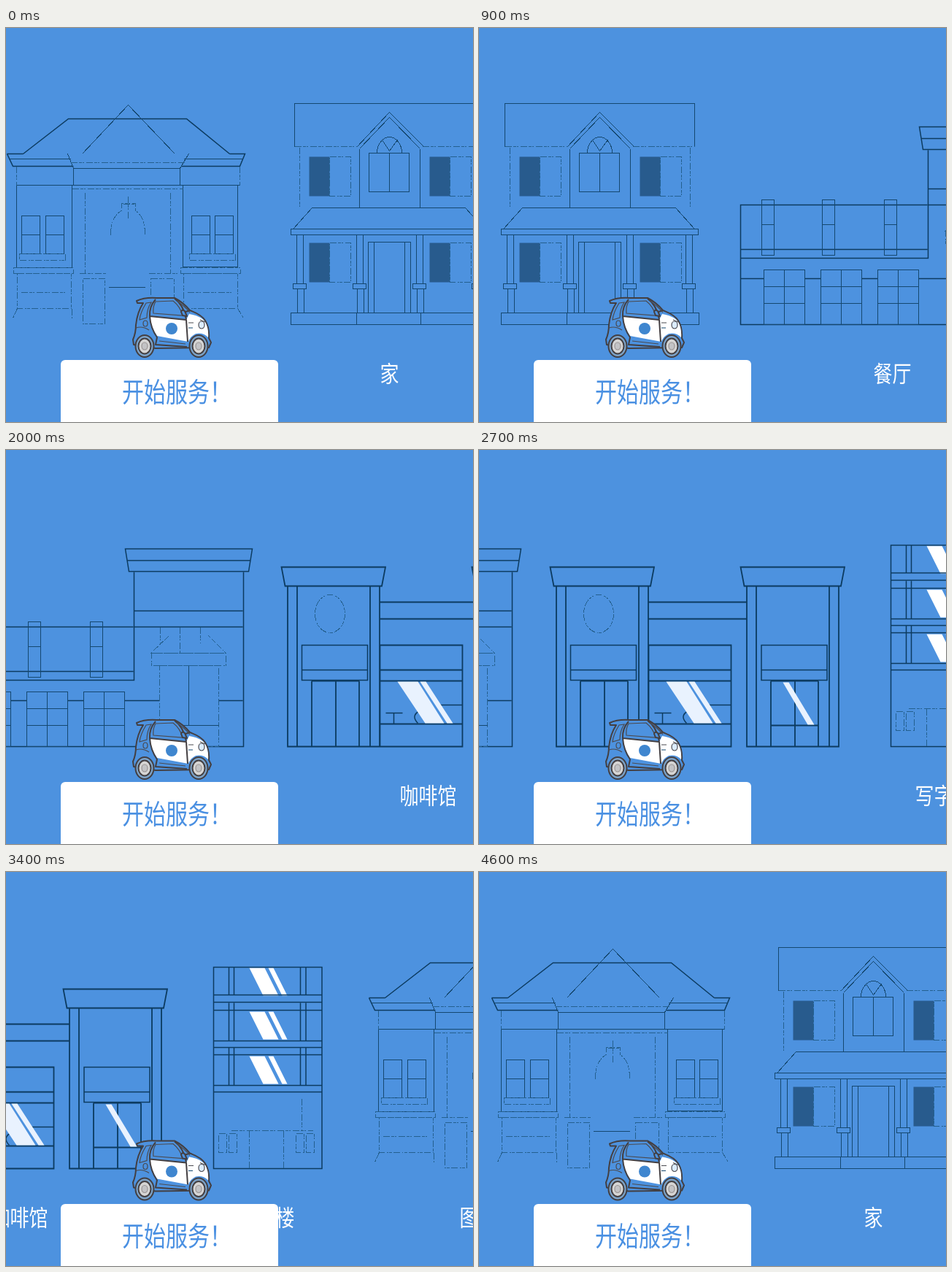
These frames come from a looping animation (640x540 px, 4.7 s). An HTML page:

```html
<!DOCTYPE html>
<html lang="zh-CN">
<head>
<meta charset="utf-8">
<title>开始服务</title>
<style>
html, body { margin: 0; height: 100%; overflow: hidden; background: #4d92df; }
svg { display: block; width: 100vw; height: 100vh; }
path, ellipse { stroke: #154870; stroke-width: 1; }
.line { shape-rendering: crispEdges; }
.bold { stroke: #0c3b60; stroke-width: 1.5; }
.heavy { stroke: #0c3b60; stroke-width: 1.8; }
.faint { shape-rendering: crispEdges; stroke: #24608f; stroke-dasharray: 9 2 4 1 2 3; }
.dark { fill: #285b8d; stroke: none; }
.glass { fill: #e9f2fe; stroke: none; }
.white { fill: #fff; stroke: none; }
text { font-family: "Noto Sans CJK SC", "Noto Sans CJK", sans-serif; fill: #fff; font-size: 26px; font-weight: 500; }
.title { fill: #4a90e2; font-size: 30px; font-weight: 400; }
#car .ink { stroke: #433f42; stroke-width: 2; stroke-linejoin: round; }
#car .thin { stroke: #4a4a50; stroke-width: 1.2; }
</style>
</head>
<body>
<svg viewBox="0 0 640 540" preserveAspectRatio="none" fill="none">
  <g id="street"></g>
  <rect x="75" y="455" width="298" height="100" rx="6" fill="#fff"/>
  <text class="title" transform="scale(1 1.24)" x="159" y="413.5">开始服务！</text>
  <g id="car">
    <path class="ink" fill="#4d92df" d="M179 374Q190 369 206 370L231 370Q243 376 252 387Q268 393 273 401Q279 411 278 425L281 431L278 438L205 439L175 434L174 427Q178 418 178 407Q180 389 188 377L180 377z"/>
    <path class="white" d="M197 395L247 400L251 392Q268 395 273 403Q278 412 277 424Q270 417 260 419Q252 423 250 430L207 422Q198 409 197 395z"/>
    <path class="ink" d="M197 395L247 400L249 430M197 395Q198 411 207 424L205 434L248 437M205 372Q196 382 197 395M231 371Q243 379 247 399M252 387L243 390"/>
    <path class="thin" d="M205 375L229 374Q239 382 242 394L202 391Q201 382 205 375zM192 377Q184 390 183 400L193 397Q193 385 199 376zM178 411Q187 408 196 414M210 429L246 433M234 374Q246 382 252 390M250 404L257 404M273 403L266 400"/>
    <path class="ink" fill="#4d92df" d="M240 389Q241 385 245 388L248 395L242 394z"/>
    <path d="M250 411H256"/>
    <ellipse class="thin" fill="#4d92df" cx="191" cy="405" rx="3" ry="4"/>
    <ellipse class="thin" fill="#dcecff" cx="268" cy="407" rx="4" ry="5"/>
    <circle cx="227" cy="412" r="8" fill="#3f86cf"/>
    <g id="wheel">
      <ellipse class="ink" fill="#7da3c8" cx="190" cy="436" rx="12.5" ry="15"/>
      <ellipse class="ink" fill="#d6d5d4" cx="190" cy="436" rx="8.5" ry="10.5"/>
      <ellipse class="thin" fill="#c3c3c5" cx="190" cy="436" rx="4" ry="5" style="stroke:#9a9595"/>
    </g>
    <use href="#wheel" x="74"/>
  </g>
</svg>
<script>
const box = (l, t, r, b) => `M${l} ${t}H${r}V${b}H${l}z`;
const hor = (y, ...ends) => ends.map((x, i) => i % 2 ? `H${x}` : `M${x} ${y}`).join('');
const ver = (x, ...ends) => ends.map((y, i) => i % 2 ? `V${y}` : `M${x} ${y}`).join('');
const each = (list, draw) => list.map(draw).join('');
const path = (kind, ...parts) => `<path class="${kind}" d="${parts.join('')}"/>`;
const label = (x, name) => `<text transform="scale(1 1.2)" x="${x}" y="403.5">${name}</text>`;
const group = (id, x, ...parts) => `<g id="${id}" transform="translate(${x} 0)">${parts.join('')}</g>`;
// A slanted reflection: top edge from a to b, bottom edge from c to d
const shine = (a, b, c, d, top, bottom) => `M${a} ${top}H${b}L${d} ${bottom}H${c}z`;

const library = group('library', 0,
  path('bold', 'M23 172L85 124H247L306 172M1 172H23M306 172H327L320 189H240M1 172L9 189H92'),
  path('line',
    hor(179, 4, 88, 243, 324),
    'M104 172L167 105L231 172M84 172L92 192H238L250 172',
    ver(92, 192, 215), ver(238, 192, 215), hor(215, 14, 320),
    box(14, 215, 90, 328), box(242, 215, 317, 327),
    each([21, 54, 254, 286], x => box(x, 257, x + 25, 309) + hor(283, x, x + 25)),
    hor(355, 140, 190)),
  path('faint',
    hor(184, 88, 245), hor(220, 90, 242), ver(14, 189, 215), ver(320, 189, 215),
    box(18, 309, 81, 318), box(251, 309, 314, 318),
    box(10, 328, 92, 336), box(239, 328, 321, 336),
    each([15, 243], x => box(x, 336, x + 74, 384) + hor(362, x + 5, x + 65)),
    'M15 384L9 397M317 384L325 397', ver(90, 384, 397),
    box(105, 343, 135, 405), box(198, 343, 230, 385),
    hor(336, 100, 137, 195, 235), ver(108, 225, 336), ver(225, 225, 336),
    'M143 283Q143 258 158 250V240H177V250Q190 258 190 283M167 230V262M160 241H175'),
  label(125, '图书馆'));

const house = group('house', 0,
  path('dark', each([415, 580], x => box(x, 176, x + 28, 230) + box(x, 294, x + 28, 348))),
  path('line',
    'M395 162V103H655V162',
    'M480 163L525 115L573 163M484 165L525 122L567 165',
    ver(484, 165, 246), ver(567, 165, 246),
    box(497, 171, 552, 224), ver(525, 171, 224),
    'M508 171A17 22 0 0 1 542 171M515 153L525 168L536 153',
    'M393 275L419 246H629L655 275', box(390, 275, 660, 283),
    each([398, 480, 562, 643], x =>
      ver(x, 283, 350) + ver(x + 9, 283, 350) + box(x - 5, 350, x + 13, 357) +
      ver(x + 1, 357, 390) + ver(x + 10, 357, 390)),
    box(496, 293, 554, 390), box(504, 293, 546, 390),
    box(390, 390, 661, 406), ver(480, 390, 406), ver(568, 390, 406)),
  path('faint',
    hor(162, 395, 481, 570, 655), ver(402, 163, 246), ver(649, 163, 246),
    each([443, 608], x => box(x, 176, x + 29, 230) + box(x, 294, x + 29, 348))),
  label(512, '家'));

const restaurant = group('restaurant', 520,
  path('bold',
    'M454 242H198V406H605V167M455 167V315H198', hor(303, 198, 454),
    'M443 135H617L612 166H448z', hor(151, 445, 614),
    hor(220, 455, 604), hor(242, 455, 604),
    hor(343, 198, 230, 286, 308, 364, 386, 442, 490, 571, 604)),
  path('line',
    each([230, 308, 386], x =>
      box(x, 331, x + 56, 406) + ver(x + 28, 331, 406) + hor(354, x, x + 56) + hor(377, x, x + 56)),
    each([227, 310, 395], x => box(x, 235, x + 17, 311) + hor(269, x, x + 17)),
    ver(530, 295, 377), hor(377, 490, 571)),
  path('faint',
    'M503 254L478 278H581L557 254', box(479, 278, 581, 295),
    box(490, 295, 571, 406), ver(491, 242, 264), ver(518, 242, 278), ver(546, 242, 264)),
  label(380, '餐厅'));

const tower = x => `M${x - 8.5} 160h142.5l-5 26h-132.5z` + box(x, 186, x + 126, 406) +
  ver(x + 13, 186, 406) + ver(x + 113, 186, 406) +
  ver(x + 33, 316, 406) + ver(x + 66, 316, 406) + ver(x + 98, 316, 406) + hor(316, x + 33, x + 98);
const sign = x => box(x, 267, x + 90, 315) + hor(301, x, x + 90);
const cafe = group('cafe', 1080,
  path('heavy',
    tower(105.5), tower(366.5), hor(208, 232, 366), hor(231, 232, 366),
    box(232, 267, 345, 406), hor(301, 232, 345), hor(316, 232, 345), hor(375, 232, 345),
    hor(377, 399, 465)),
  path('bold', sign(125), sign(386.5), hor(349, 310, 345),
    hor(360, 240, 263), ver(251, 360, 375), 'M286 357Q274 364 284 374'),
  '<ellipse class="faint" cx="163.5" cy="224" rx="20.5" ry="26"/>',
  path('glass', shine(256, 284, 294, 320, 317, 374), shine(287, 295, 324, 332, 317, 374),
    shine(416, 424, 450, 459, 318, 376)),
  label(259, '咖啡馆'));

const floors = [131, 191, 252];
const office = group('office', 1360,
  path('white', each(floors, y =>
    shine(333, 354, 352, 373, y, y + 38) + shine(359, 366, 378, 385, y, y + 38))),
  path('bold',
    box(284, 130, 432.5, 406),
    each([168, 178, 189, 231, 240, 250, 292, 301], y => hor(y, 284, 433)),
    each([305, 312, 403, 410.5], x => ver(x, 130, 168, 179, 231, 240, 292))),
  path('faint',
    ver(405, 310, 354), hor(354, 308, 420), ver(333, 354, 406), ver(380, 354, 406),
    each([291, 397], x => box(x, 358, x + 11, 384) + box(x + 14, 358, x + 25, 384))),
  label(317, '写字楼'));

const street = document.getElementById('street');
const car = document.getElementById('car');
street.innerHTML = library + house + restaurant + cafe + office +
  '<use href="#library" x="1856"/><use href="#house" x="1855"/>';

const LOOP = 4700, STEP = 100, STRIDE = 40;
function frame() {
  const step = Math.floor(performance.now() % LOOP / STEP);
  street.setAttribute('transform', `translate(${0.5 - step * STRIDE} 0.5)`);
  car.setAttribute('transform', `translate(0 ${step % 3 === 1 ? -1.5 : 0})`);
  requestAnimationFrame(frame);
}
frame();
</script>
</body>
</html>
```
